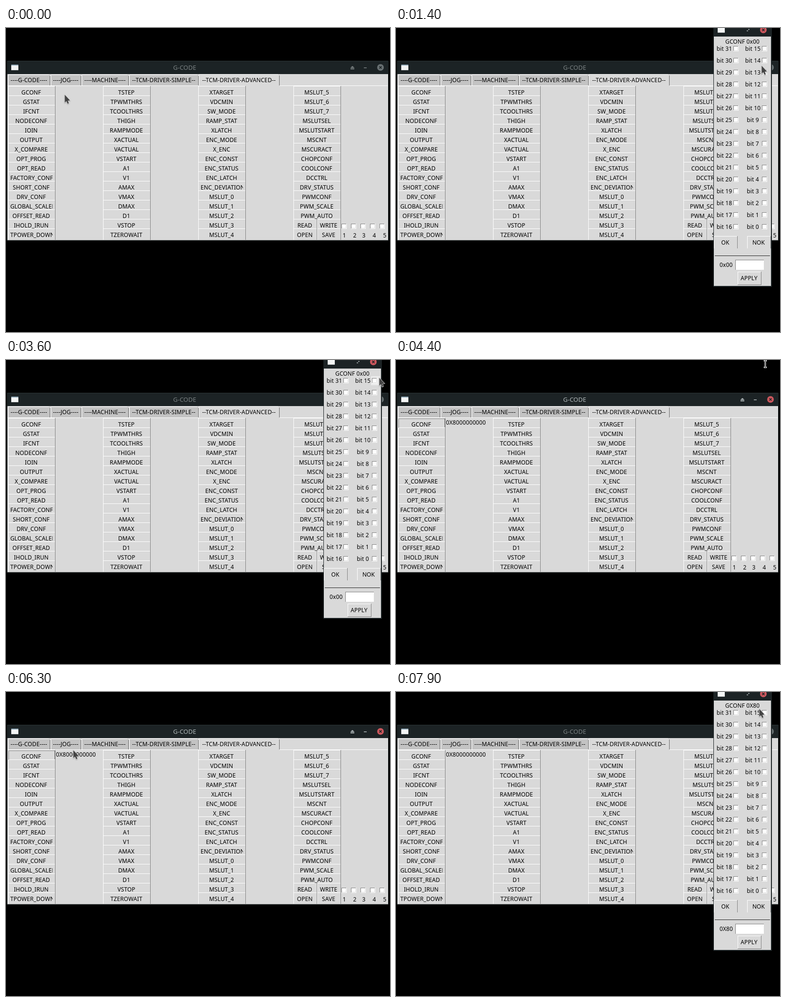
Write an HTML page with a canvas that moves like this. It is 807 px wide and 640 px high and loops after 8000 ms.

```html
<!DOCTYPE html>
<html lang="en">
<head>
<meta charset="utf-8">
<title>Register editor</title>
<style>
html, body { margin: 0; width: 100%; height: 100%; overflow: hidden; background: #000; }
canvas { display: block; }
</style>
</head>
<body>
<canvas id="stage" width="807" height="640"></canvas>
<script>
const ctx = document.getElementById('stage').getContext('2d');
const LOOP = 8000, STEP = 100;
const FACE = '#d9d9d9', HOVER = '#ececec', DARK = '#828282', BAR = '#1c2325';

const columns = [
  'GCONF GSTAT IFCNT NODECONF IOIN OUTPUT X_COMPARE OPT_PROG OPT_READ FACTORY_CONF SHORT_CONF DRV_CONF GLOBAL_SCALER OFFSET_READ IHOLD_IRUN TPOWER_DOWN',
  'TSTEP TPWMTHRS TCOOLTHRS THIGH RAMPMODE XACTUAL VACTUAL VSTART A1 V1 AMAX VMAX DMAX D1 VSTOP TZEROWAIT',
  'XTARGET VDCMIN SW_MODE RAMP_STAT XLATCH ENC_MODE X_ENC ENC_CONST ENC_STATUS ENC_LATCH ENC_DEVIATION MSLUT_0 MSLUT_1 MSLUT_2 MSLUT_3 MSLUT_4',
  'MSLUT_5 MSLUT_6 MSLUT_7 MSLUTSEL MSLUTSTART MSCNT MSCURACT CHOPCONF COOLCONF DCCTRL DRV_STATUS PWMCONF PWM_SCALE PWM_AUTO'
].map(names => names.split(' '));

const tabs = [
  ['----G-CODE----', 4, 93], ['----JOG----', 94, 158], ['----MACHINE----', 159, 258],
  ['--TCM-DRIVER-SIMPLE--', 259, 405], ['--TCM-DRIVER-ADVANCED--', 405, 575]
];

// Pointer path: time, x, y
const path = [
  [0, 123, 140], [400, 82, 136], [1100, 82, 136], [1400, 768, 79], [1700, 772, 30],
  [1900, 770, 2], [2200, 764, 4], [2400, 722, 36], [2600, 752, 47], [2900, 772, 45],
  [3200, 774, 46], [3600, 784, 37], [3900, 772, 6], [4200, 776, 8], [4500, 776, 8],
  [4900, 520, 52], [5400, 131, 120], [5600, 111, 133], [5900, 128, 140], [6100, 147, 129],
  [6300, 141, 122], [6600, 76, 130], [7200, 76, 130], [7500, 480, 78], [7900, 763, 35],
  [8000, 763, 35]
];

function pointerAt(t) {
  const i = path.findIndex((p, n) => n && p[0] >= t);
  const [a, b] = [path[i - 1], path[i]];
  const k = (t - a[0]) / (b[0] - a[0]);
  return [1, 2].map(n => Math.round(a[n] + (b[n] - a[n]) * k));
}

function rect(x, y, w, h, color) {
  ctx.fillStyle = color;
  ctx.fillRect(x, y, w, h);
}

function text(s, x, y, align = 'center', color = '#000', size = 12) {
  ctx.font = size + 'px "Noto Sans", "Open Sans", sans-serif';
  ctx.letterSpacing = size === 12 ? '0.1px' : '0px';
  ctx.textAlign = align;
  ctx.fillStyle = color;
  ctx.fillText(s, x, y);
}

function shape(points, x, y) {
  ctx.beginPath();
  points.forEach(([px, py]) => ctx.lineTo(x + px, y + py));
  ctx.closePath();
}

function button(label, x, y, w, h, color = FACE) {
  rect(x, y, w, h, color);
  rect(x, y, w, 1, '#fff');
  rect(x, y, 1, h, '#fff');
  rect(x + w - 1, y, 1, h, DARK);
  ctx.save();
  ctx.beginPath();
  ctx.rect(x + 5, y, w - 11, 26);
  ctx.clip();
  ctx.font = '12px "Noto Sans", "Open Sans", sans-serif';
  const wide = ctx.measureText(label).width > w - 11;
  text(label, wide ? x + 5 : x + w / 2 - 1, y + 18, wide ? 'left' : 'center');
  ctx.restore();
}

function checkbox(x, y) {
  rect(x, y, 11, 11, '#fff');
  rect(x, y, 10, 1, DARK);
  rect(x, y, 1, 10, DARK);
  rect(x + 1, y + 9, 9, 1, FACE);
  rect(x + 9, y + 1, 1, 9, FACE);
}

function windowIcon(x, y) {
  rect(x, y, 15, 12, '#f4f6f6');
  rect(x, y, 15, 2, '#8ba4b4');
  rect(x, y + 11, 15, 1, '#c5cacb');
}

function closeIcon(x, y, color) {
  ctx.fillStyle = color;
  ctx.beginPath();
  ctx.arc(x, y, 7, 0, 7);
  ctx.fill();
  ctx.strokeStyle = BAR;
  ctx.lineWidth = 1.7;
  ctx.beginPath();
  for (const s of [-1, 1]) {
    ctx.moveTo(x - 2.5, y - 2.5 * s);
    ctx.lineTo(x + 2.5, y + 2.5 * s);
  }
  ctx.stroke();
}

function drawTabs() {
  tabs.forEach(([label, x, end], i) => {
    const top = i === 4 ? 97 : 98;
    const w = end - x;
    ctx.fillStyle = i === 4 ? FACE : '#c3c3c3';
    shape([[0, 1], [1, 0], [w - 3, 0], [w, 3], [w, 121 - top], [0, 121 - top]], x, top);
    ctx.fill();
    rect(x, top + 1, 1, 120 - top, '#fff');
    rect(x + 1, top, w - 4, 1, '#fff');
    rect(end - 1, top + 3, 1, 121 - top - 3, '#666');
    text(label, (x + end) / 2 - 0.5, 114);
  });
  rect(3, 121, 402, 1, '#fff');
  rect(575, 121, 227, 1, '#fff');
}

function drawMain({ active, hover, focus, value }) {
  rect(2, 69, 802, 379, '#171d1e');
  rect(2, 70, 802, 27, BAR);
  rect(3, 69, 800, 1, '#2c3537');
  windowIcon(11, 77);
  const ink = active ? '#b0b8b9' : '#7b8283';
  text('G-CODE', 375.5, 88, 'center', ink, 13);
  ctx.fillStyle = ink;
  shape([[0, 4], [4.5, 0], [9, 4]], 723.5, 80);
  ctx.fill();
  rect(724, 85, 8, 2, ink);
  rect(752, 83, 6, 1.5, ink);
  closeIcon(787, 83, active ? '#cc575d' : '#687072');

  rect(3, 97, 800, 350, FACE);
  drawTabs();
  columns.forEach((names, c) => names.forEach((name, r) =>
    button(name, 4 + c * 200, 122 + r * 20, 100, r === 15 ? 24 : 20, hover && !c && !r ? HOVER : FACE)));
  [['READ', 'WRITE'], ['OPEN', 'SAVE']].forEach((row, r) => row.forEach((name, c) =>
    button(name, 604 + c * 50, 402 + r * 20, 50, r ? 24 : 20)));
  [711, 733, 752, 774, 796].forEach((x, i) => {
    checkbox(705 + i * 20, 412);
    text(i + 1, x, 441);
  });
  rect(3, 446, 800, 1, '#9a9a9a');

  if (focus) {
    ctx.strokeStyle = '#000';
    ctx.lineWidth = 1;
    ctx.setLineDash([1, 1]);
    ctx.beginPath();
    ctx.moveTo(5.5, 142);
    ctx.lineTo(5.5, 123.5);
    ctx.lineTo(102.5, 123.5);
    ctx.lineTo(102.5, 142);
    ctx.stroke();
    ctx.setLineDash([]);
  }
  if (value) text('0X8000000000', 105, 136, 'left');
}

function drawPopup(code, hoverBit) {
  rect(667, 0, 123, 545, BAR);
  windowIcon(676, -2);
  rect(737, 5, 3, 2, '#8a9294');
  rect(740, 2, 3, 2, '#8a9294');
  closeIcon(772, 4, '#cc575d');
  rect(668, 18, 120, 525, FACE);
  text('GCONF ' + code, 728, 33);
  for (let i = 0; i < 16; i++) {
    const y = 48 + i * 25;
    if (i === hoverBit) rect(767, y - 14, 19, 19, HOVER);
    text('bit ' + (31 - i), 690, y);
    text('bit ' + (15 - i), 750, y);
    checkbox(709, y - 10);
    checkbox(769, y - 10);
  }
  button('OK', 668, 438, 50, 26);
  button('NOK', 738, 438, 50, 26);
  rect(670, 479, 116, 1, '#222');
  text(code, 680, 503, 'left');
  rect(713, 488, 60, 21, '#fff');
  rect(713, 488, 60, 1, DARK);
  rect(713, 488, 1, 21, DARK);
  button('APPLY', 718, 513, 50, 28);
  rect(718, 540, 50, 1, DARK);
}

function drawArrow(x, y) {
  ctx.save();
  ctx.shadowColor = 'rgba(0,0,0,.3)';
  ctx.shadowBlur = 2;
  ctx.shadowOffsetY = 1;
  shape([[0.5, 0.5], [0.5, 17], [4, 14], [6.5, 19.5], [9, 18.5], [7, 13], [11.5, 12.5]], x, y);
  ctx.lineWidth = 1.4;
  ctx.strokeStyle = '#e4e4e4';
  ctx.stroke();
  ctx.restore();
  ctx.fillStyle = '#444';
  ctx.fill();
}

function drawBeam(x, y) {
  for (const [grow, color] of [[1, '#fff'], [0, '#111']]) {
    rect(x - 2 - grow, y - 7 - grow, 4 + 2 * grow, 1 + 2 * grow, color);
    rect(x - 2 - grow, y + 7 - grow, 4 + 2 * grow, 1 + 2 * grow, color);
    rect(x - 0.5 - grow, y - 7, 1 + 2 * grow, 14, color);
  }
}

function draw(now) {
  const t = Math.floor(now % LOOP / STEP) * STEP;
  const within = (from, to) => t >= from && t < to;
  const [x, y] = pointerAt(t);
  const popup = within(800, 4200) || t >= 7000;
  const active = within(700, 800) || within(4200, 7000);
  const row = Math.floor((y - 34) / 25);
  const onBit = x >= 767 && x < 786 && y >= 34 && y - 34 - row * 25 < 19;

  rect(0, 0, 807, 640, '#000');
  drawMain({
    active,
    hover: within(200, 1200) || within(6500, 7300),
    focus: active,
    value: t >= 4200
  });
  if (popup) drawPopup(t < 4200 ? '0x00' : '0X80', onBit ? row : -1);
  (within(4200, 4700) ? drawBeam : drawArrow)(x, y);
  requestAnimationFrame(draw);
}
requestAnimationFrame(draw);
</script>
</body>
</html>
```
